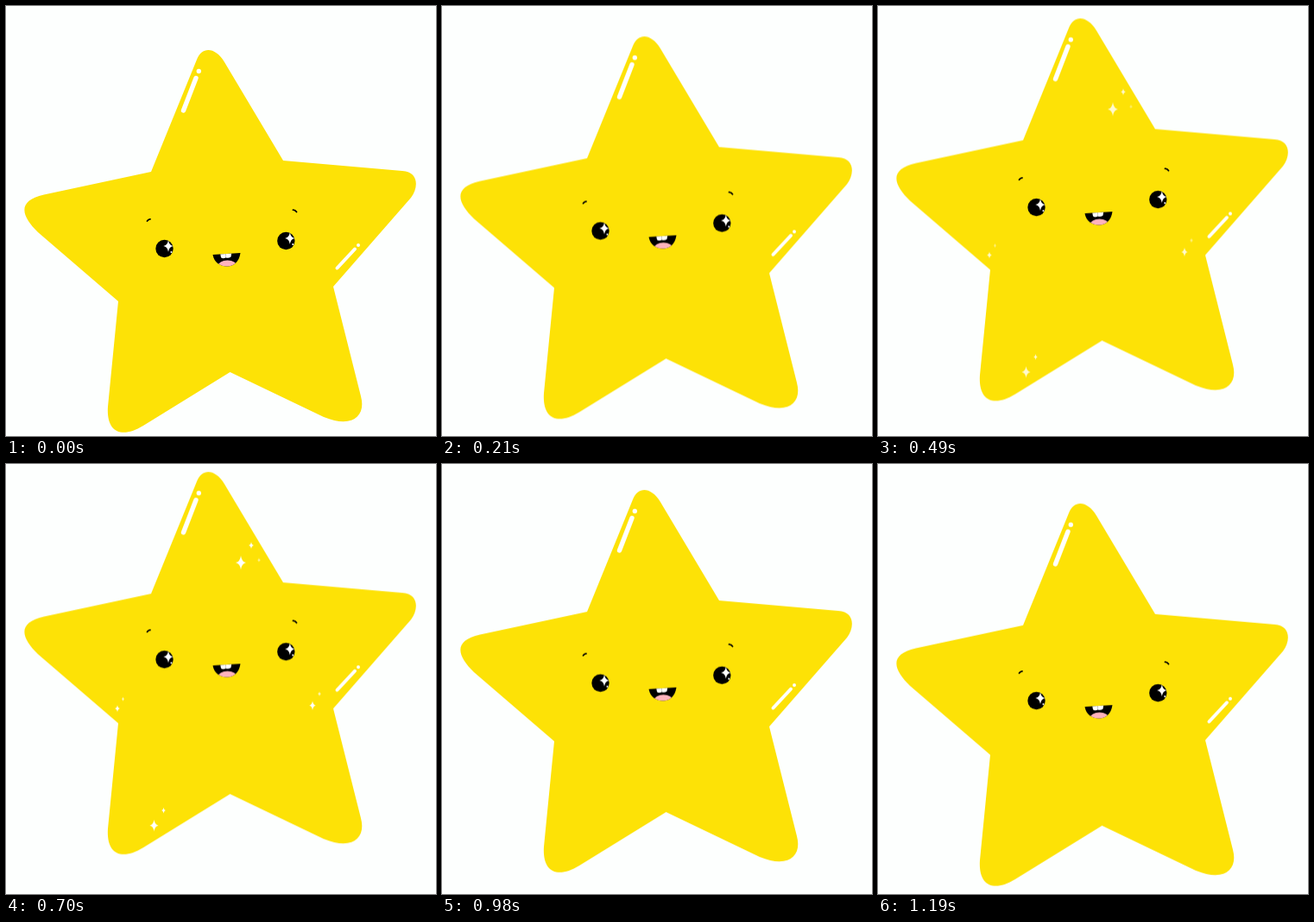
Write an HTML page without scripts that moves like this. It is 498x498 px and loops after 1.26 s.

```html
<!DOCTYPE html>
<html lang="en">
<head>
<meta charset="utf-8">
<title>Floating star</title>
<style>
html, body { margin: 0; width: 100%; height: 100%; overflow: hidden; background: #fdfffe; }
svg { display: block; width: 100%; height: 100%; }
.star, .face, .glint, .speck { animation: 1260ms steps(9) infinite; }
.star { animation-name: rise; }
.face { animation-name: lift; }
.glint { animation-name: shine; }
.speck { animation-name: twinkle; }
@keyframes rise { 50% { transform: translateY(-47px); } }
@keyframes lift { 50% { transform: translateY(-14.5px); } }
@keyframes shine {
  0% { opacity: 0; }
  16.667% { opacity: 0; animation-timing-function: steps(5); }
  44.444%, 55.556% { opacity: 1; animation-timing-function: steps(4); }
  77.778%, 100% { opacity: 0; }
}
@keyframes twinkle {
  0% { opacity: 0; }
  27.778% { opacity: 0; animation-timing-function: steps(4); }
  50% { opacity: 1; animation-timing-function: steps(4); }
  72.222%, 100% { opacity: 0; }
}
</style>
</head>
<body>
<svg viewBox="0 0 498 498">
  <defs>
    <path id="spark" d="M0-8Q1-1 6 0Q1 1 0 8Q-1 1-6 0Q-1-1 0-8Z" fill="#fff"/>
    <g id="eye">
      <circle r="10.2"/>
      <use href="#spark" transform="translate(4.5 -3) scale(.95 .85)"/>
      <circle cx="8" cy="4" r="1.1" fill="#fff"/>
    </g>
    <clipPath id="lips"><path id="grin" d="M239.5 288L271.5 286C270 296 264 301.5 256 301.5S241 297 239.5 288Z"/></clipPath>
  </defs>

  <g class="star">
    <path fill="#fde206" d="M168 192L221 62C227 47 242 47 253 65L321 179L459 191C478 192 478 210 469 222L379 325L411 452C417 474 402 490 368 476L259.5 424L159 486C133 502 116 493 118 464L130 342L37 262C18 243 12 226 44 218.5Z"/>

    <g stroke="#fff" stroke-linecap="round">
      <path stroke-width="5.4" d="M205.5 121L220 83.500M223.300 75.500h.01"/>
      <path stroke-width="4" d="M383.500 303.500L404 281.500M408 277h.01"/>
    </g>

    <g class="glint">
      <use href="#spark" transform="translate(272 156)"/>
      <use href="#spark" transform="translate(284 136) scale(.5)"/>
      <use href="#spark" transform="translate(129 325) scale(.5)"/>
      <use href="#spark" transform="translate(355 321.500) scale(.65)"/>
      <use href="#spark" transform="translate(171.500 460.500) scale(.85)"/>
      <use href="#spark" transform="translate(182.500 443) scale(.4)"/>
    </g>
    <g class="speck">
      <use href="#spark" transform="translate(293 153) scale(.28)"/>
      <use href="#spark" transform="translate(135.500 314) scale(.3)"/>
      <use href="#spark" transform="translate(363 308) scale(.35)"/>
    </g>

    <g class="face">
      <use href="#eye" x="183.500" y="281"/>
      <use href="#eye" x="324.300" y="272"/>
      <path d="M163.500 249Q165 247 167 246.800M332.500 236.200Q335 236.300 336.500 238.500" fill="none" stroke="#000" stroke-width="1.8" stroke-linecap="round"/>
      <use href="#grin"/>
      <g clip-path="url(#lips)">
        <ellipse cx="256.500" cy="301" rx="11" ry="6.500" fill="#ffb3bd"/>
        <path d="M248 286L254.500 286V291.500Q251 293 249 291.300ZM254.700 286H261.300L260.500 290.500Q258 292.500 254.700 291.500Z" fill="#fff"/>
      </g>
    </g>
  </g>
</svg>
</body>
</html>
```
